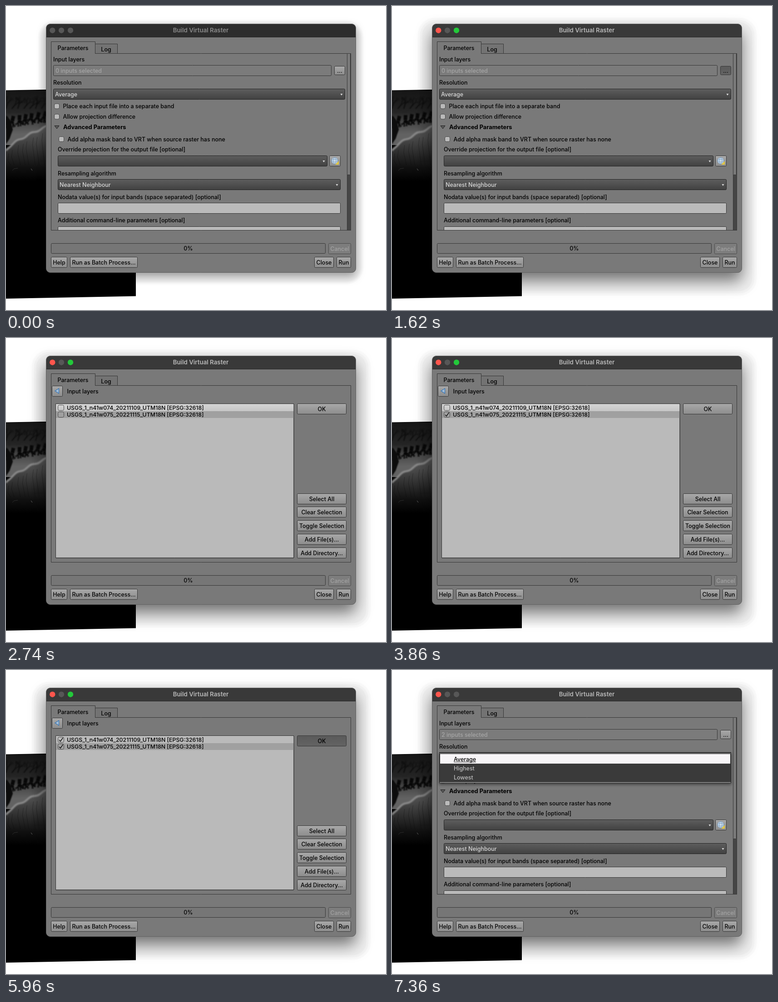
Recreate the animation shown at these times as an HTML page with a canvas. Size 837 px wide and 669 px high, loop 8000 ms.

```html
<!DOCTYPE html>
<html lang="en">
<head>
<meta charset="utf-8">
<title>Build Virtual Raster</title>
<style>
  html, body { margin: 0; width: 100%; height: 100%; overflow: hidden; background: #fff; }
  canvas { display: block; }
</style>
</head>
<body>
<canvas id="stage" width="837" height="669"></canvas>
<script>
const ctx = document.getElementById('stage').getContext('2d');
const LOOP = 8000;
const EDGE = '#363636', BODY = '#797979', FIELD = '#bababa';
const RAISED = ['#a9a9a9', '#8d8d8d'], PRESSED = ['#5a5a5a', '#636363'];
const DARK = ['#5e5e5e', '#424242'], DARK_PRESSED = ['#5a5a5a', '#464646'];
const CHANGES = [0, 500, 1620, 1760, 2740, 2810, 3160, 3860, 4630, 4770,
                 5120, 5260, 5330, 5470, 5960, 6100, 6870, 7360];

function paint(fill, y, h) {
  if (!Array.isArray(fill)) return fill;
  const g = ctx.createLinearGradient(0, y, 0, y + h);
  fill.forEach((c, i) => g.addColorStop(i / (fill.length - 1), c));
  return g;
}

function box(x, y, w, h, fill, radius = 2, stroke = EDGE) {
  ctx.beginPath();
  ctx.roundRect(x + .5, y + .5, w, h, radius);
  if (fill) { ctx.fillStyle = paint(fill, y, h); ctx.fill(); }
  if (stroke) { ctx.strokeStyle = stroke; ctx.lineWidth = 1; ctx.stroke(); }
}

function rect(x, y, w, h, fill) {
  ctx.fillStyle = paint(fill, y, h);
  ctx.fillRect(x, y, w, h);
}

// y is the middle of the capital letters
function text(str, x, y, { color = '#000', size = 12.45, weight = 500, align = 'left' } = {}) {
  ctx.font = `${weight} ${size}px Inter, sans-serif`;
  ctx.textAlign = align;
  ctx.fillStyle = color;
  ctx.fillText(str, x, y + 4.6);
}

function poly(points, fill, stroke, width = 1, close = true) {
  ctx.beginPath();
  points.forEach(([x, y]) => ctx.lineTo(x, y));
  if (close) ctx.closePath();
  if (fill) { ctx.fillStyle = fill; ctx.fill(); }
  if (stroke) { ctx.strokeStyle = stroke; ctx.lineWidth = width; ctx.stroke(); }
}

function disc(x, y, r, fill) {
  ctx.beginPath();
  ctx.arc(x, y, r, 0, 7);
  ctx.fillStyle = fill;
  ctx.fill();
}

function button(label, x, y, w, h = 23, pressed = false) {
  box(x, y, w, h, pressed ? PRESSED : RAISED);
  text(label, x + w / 2 + .5, y + h / 2 + .5, { align: 'center' });
}

function combo(label, x, y, w, pressed = false) {
  box(x, y, w, 23, pressed ? DARK_PRESSED : DARK, 2, '#242424');
  text(label, x + 4, y + 12, { color: '#d8d8d8' });
  const ax = x + w - 7, ay = y + 11;
  poly([[ax - 2.5, ay], [ax + 2.5, ay], [ax, ay + 4]], '#dcdcdc');
}

function checkbox(x, y, label) {
  box(x - 6, y - 6, 11, 11, FIELD, 3, '#464646');
  text(label, x + 13.5, y);
}

function terrain() {
  let seed = 11;
  const rnd = () => (seed = seed * 16807 % 2147483647) / 2147483647;
  const ridge = x => 318 - 52 * Math.pow(x / 88, .72) + 2 * Math.sin(x / 5);

  poly([[0, 185.5], [88, 184], [286, 182], [286, 638.5], [0, 644]], '#000');
  ctx.save();
  ctx.beginPath();
  ctx.rect(0, 186, 89, 200);
  ctx.clip();
  rect(0, 186, 89, 120, ['#161616', '#1c1c1c', '#242424', '#484848', '#626262', '#626262']);

  const branch = (x, y, angle, length, width, color) => {
    const x2 = x + Math.cos(angle) * length, y2 = y + Math.sin(angle) * length;
    poly([[x, y], [x2, y2]], null, color, width, false);
    if (length < 4) return;
    for (const side of [-1, 1])
      branch(x2, y2, angle + side * (.2 + rnd() * .6), length * .65, width * .62, color);
  };
  // faint upper streams, then dark valleys reaching down towards the ridge
  ctx.filter = 'blur(.8px)';
  for (let i = 0; i < 8; i++) branch(i * 13, 226, -1.3 + rnd() * .5, 12, 2, '#0b0b0b');
  for (let i = 0; i < 7; i++) branch(i * 14 + rnd() * 5, 244 - i * 2, 1.5 + rnd() * .5, 11, 8, '#080808');
  poly([[0, 240], [10, 252], [15, 272], [8, 292], [0, 304]], '#0c0c0c');
  ctx.filter = 'none';

  // slope fading out below the ridge
  const crest = Array.from({ length: 24 }, (_, i) => [i * 4, ridge(i * 4)]);
  ctx.save();
  poly([...crest, [92, 386], [0, 386]]);
  ctx.clip();
  rect(0, 264, 89, 122, ['#606060', '#464646', '#2b2b2b', '#101010', '#000']);
  for (let i = 0; i < 9; i++) {
    const x = i * 11 + rnd() * 6;
    poly([[x, ridge(x) + 12], [x - 2, ridge(x) + 28], [x + 4, 350]], null, 'rgba(0,0,0,.3)', 1, false);
  }
  ctx.restore();
  ctx.filter = 'blur(1.6px)';
  poly(crest, null, '#8c8c8c', 4, false);
  ctx.filter = 'none';
  poly([[14, 362], [18, 358], [26, 357]], null, '#2c2c2c', 1, false);
  poly([[55, 358], [58, 362]], null, '#666', 1, false);
  ctx.restore();
}

function shadow(active) {
  // stepped outer rim
  const [x, y, w, h] = active ? [56, 25, 747, 612] : [70, 31, 717, 581];
  const step = active ? 5 : 3;
  for (let i = 0; i < 3; i++) {
    const inset = i * step;
    box(x + inset, y + inset, w - 2 * inset, h - 2 * inset, 'rgba(0,0,0,.018)', 38 - inset, null);
  }
  ctx.save();
  ctx.shadowColor = active ? 'rgba(0,0,0,.53)' : 'rgba(0,0,0,.38)';
  ctx.shadowBlur = active ? 34 : 20;
  ctx.shadowOffsetY = active ? 18 : 8;
  box(88, 39, 682, 547, BODY, 9, null);
  ctx.restore();
}

function dialog(t) {
  const active = t >= 500, menuOpen = t >= 7360;
  shadow(active);
  box(88, 39, 682, 547, BODY, 9, null);
  ctx.beginPath();
  ctx.roundRect(88.5, 39.5, 682, 29, [9, 9, 0, 0]);
  ctx.fillStyle = active ? '#393939' : '#2d2d2d';
  ctx.fill();
  rect(88, 68, 683, 1, '#262626');
  box(88, 39, 682, 547, null, 9, '#606060');
  text('Build Virtual Raster', 429, 53.5,
    { color: active ? '#b8b8b8' : '#8a8a8a', weight: 600, size: 13.3, align: 'center' });
  disc(102.3, 53.7, 6.2, active ? '#ff564d' : '#575757');
  disc(122, 53.7, 6.2, '#575757');
  disc(142, 53.7, 6.2, active && !menuOpen ? '#23c93a' : '#575757');

  // tabs and their panel
  box(99, 104, 660, 389, null, 0);
  box(196, 83, 49, 21, '#737373', 0);
  box(99, 78, 97, 26, BODY, 0);
  rect(100, 104, 96, 1, BODY);
  text('Parameters', 147.5, 92.5, { align: 'center' });
  text('Log', 220.5, 95, { align: 'center' });

  // footer
  box(99, 522, 604, 22, '#767676');
  text('0%', 401.5, 533.5, { align: 'center' });
  box(710, 522, 49, 23, '#7d7d7d', 2, '#4a4a4a');
  text('Cancel', 735, 534.5, { color: '#a2a2a2', align: 'center' });
  button('Help', 99, 552, 35);
  button('Run as Batch Process...', 141, 552, 148);
  button('Close', 679, 552, 42);
  button('Run', 728, 552, 31);
}

function parameters(t) {
  const pressed = t >= 1620 && t < 1760;
  text('Input layers', 104, 117);
  box(104, 130, 612, 23, '#7b7b7b');
  text(`${t < 6100 ? 0 : 2} inputs selected`, 109, 142, { color: '#a6a6a6' });
  button('...', 723, 132, 23, 19, pressed);
  text('Resolution', 104, 168.5);
  combo('Average', 104, 182, 642, t >= 6870);
  checkbox(112, 220.5, 'Place each input file into a separate band');
  checkbox(112, 243.5, 'Allow projection difference');
  poly([[107, 263.5], [117, 263.5], [112, 270]], '#5c5c5c', '#1c1c1c');
  text('Advanced Parameters', 126, 266.5, { weight: 700, size: 12.8 });
  checkbox(122, 293, 'Add alpha mask band to VRT when source raster has none');
  text('Override projection for the output file [optional]', 114, 315.5);
  combo('', 114, 329, 593);
  projectionButton();
  text('Resampling algorithm', 114, 368);
  combo('Nearest Neighbour', 114, 381, 622);
  text('Nodata value(s) for input bands (space separated) [optional]', 114, 420);
  box(114, 433, 622, 23, FIELD);
  text('Additional command-line parameters [optional]', 114, 471);
  ctx.save();
  ctx.beginPath();
  ctx.rect(100, 480, 651, 13);
  ctx.clip();
  box(114, 485, 622, 23, FIELD);
  ctx.restore();

  box(751, 104, 8, 389, '#464646', 0);
  box(751, 104, 7, 267, BODY, 1);
  if (t >= 7360) menu();
}

function projectionButton() {
  box(712, 329, 24, 23, RAISED);
  disc(724, 340.5, 7, '#c9d9e8');
  ctx.strokeStyle = '#6e93b8';
  ctx.lineWidth = .8;
  for (const [rx, ry] of [[7, 7], [3, 7], [7, 3]]) {
    ctx.beginPath();
    ctx.ellipse(724, 340.5, rx, ry, 0, 0, 7);
    ctx.stroke();
  }
  poly([[725, 349], [733, 341], [733, 349]], '#e3c640');
}

function menu() {
  ctx.save();
  ctx.shadowColor = 'rgba(0,0,0,.5)';
  ctx.shadowBlur = 6;
  ctx.shadowOffsetY = 3;
  rect(104, 181, 643, 68, '#262626');
  ctx.restore();
  rect(105, 183, 641, 1, '#a8a8a8');
  rect(105, 184, 641, 63, '#3a3a3a');
  rect(105, 247, 641, 1, '#c4c4c4');
  rect(106, 185, 639, 21, '#f7f5f7');
  text('Average', 136, 196);
  rect(136, 202, 49, 1, '#222');
  text('Highest', 136, 216, { color: '#c0c0c0' });
  text('Lowest', 136, 236, { color: '#c0c0c0' });
}

function layerRow(label, y, base, hovered, checked) {
  rect(110, y, 524, 15, hovered ? ['#d4d4d4', '#c6c6c6'] : base);
  box(114, y + 1, 13, 12, null, 3, '#484848');
  if (checked) poly([[117, y + 8], [119.8, y + 11], [125.5, y + 3]], null, '#151515', 1.5, false);
  text(label, 134, y + 7.5, { size: 12.3 });
}

function layerList(t) {
  const during = (...spans) => spans.some(([from, to]) => t >= from && t < to);
  box(101, 105, 23, 23, RAISED);
  poly([[108, 116.5], [116.5, 111], [116.5, 122]], '#a3bdd6', '#3172b4', 1.2);
  text('Input layers', 134.5, 117);
  box(109, 144, 524.5, 339.5, FIELD, 1);
  layerRow('USGS_1_n41w074_20211109_UTM18N [EPSG:32618]', 146, FIELD,
    during([2740, 2810], [3860, 4770], [5330, 5470]), t >= 4630);
  layerRow('USGS_1_n41w075_20221115_UTM18N [EPSG:32618]', 161, '#a0a0a0',
    during([3160, 3860], [4770, 5120], [5260, 5330]), t >= 3160);
  box(109, 144, 524.5, 339.5, null, 1);
  button('OK', 641, 144, 108, 23, t >= 5960);
  ['Select All', 'Clear Selection', 'Toggle Selection', 'Add File(s)...', 'Add Directory...']
    .forEach((label, i) => button(label, 641, 342 + Math.floor(i * 29.75), 108, 23));
}

function draw(t) {
  rect(0, 0, 837, 669, '#fff');
  terrain();
  dialog(t);
  if (t >= 1760 && t < 6100) layerList(t);
  else parameters(t);
}

let shown;
const start = performance.now();
function tick() {
  const t = (performance.now() - start) % LOOP;
  const current = CHANGES.findLast(change => change <= t);
  if (current !== shown) draw(shown = current);
  requestAnimationFrame(tick);
}
tick();
</script>
</body>
</html>
```
